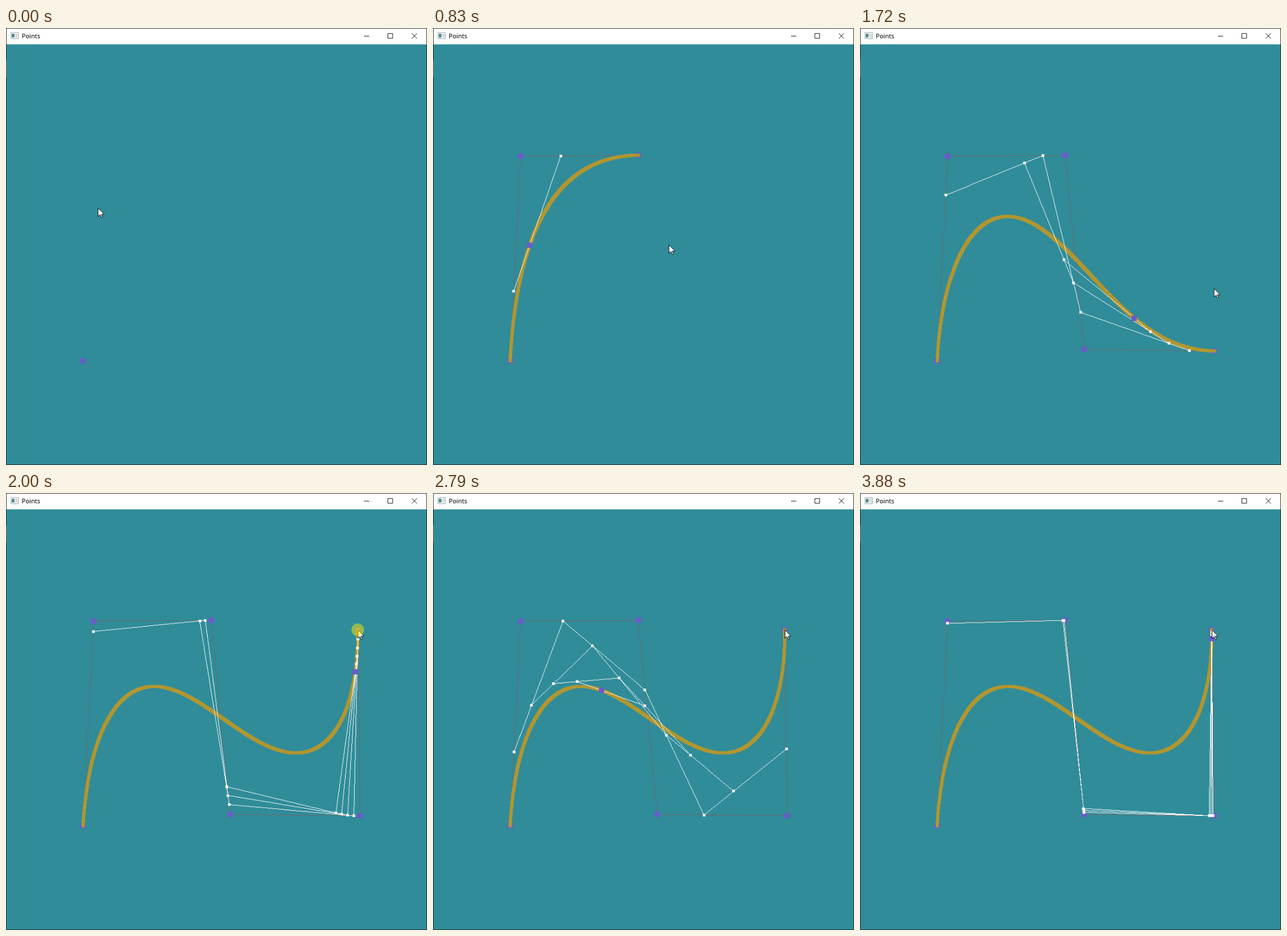
An HTML page with a canvas for the animation above (3.93 s loop, 735 px wide and 762 px high).

```html
<!DOCTYPE html>
<html lang="en">
<head>
<meta charset="utf-8">
<title>Points</title>
<style>
  html, body { margin: 0; width: 100%; height: 100%; overflow: hidden; background: #fff; }
  canvas, svg { position: absolute; left: 0; top: 0; display: block; width: 735px; height: 762px; }
  text { font: 12px "Noto Sans", "Open Sans", sans-serif; fill: #000; }
</style>
</head>
<body>
<!-- The window is laid out at 802 x 831 and shown slightly reduced -->
<canvas width="802" height="831"></canvas>
<svg viewBox="0 0 802 831" preserveAspectRatio="none" fill="none">
  <path d="M0 0H802V31H0Z" fill="#fff"/>
  <path d="M.5 .5H801.5V830.5H.5Z" stroke="#1c2325"/>
  <path d="M0 62h1v31h-1z" fill="#8a6a62"/>
  <path d="M9.5 8.5h14v12h-14z" fill="#f4f6f6" stroke="#9ba3a8"/>
  <path d="M11 11h5v7h-5z" fill="#438a8a"/>
  <path d="M17 11h5v7h-5z" fill="#d5dcda"/>
  <path d="M682 15.5h10M727.5 10.5h9v9h-9zM773 10l10 10m0-10l-10 10" stroke="#000"/>
  <text x="30" y="20">Points</text>
</svg>
<script>
const ctx = document.querySelector('canvas').getContext('2d');
const LOOP = 3930, FRAMES = 85, STEP = LOOP / FRAMES;
const TEAL = '#308c99', PURPLE = '#6a5acd', GOLD = '#b2962f', WHITE = '#fff', BROWN = '#73676a';

// Control points in click order, and the bends the mouse takes between them
const points = [[147, 633], [167, 244], [391, 242], [427, 611], [675, 614], [670, 260]];
const bends = [[191, 441], [279, 243], [491, 424], [561, 636], [673, 437]];

// One click per beat: a short hold, then the way to the next point
const BEAT = 455, FIRST_CLICK = 145, HOLD = .22;

// Curve parameter over time; the whole part counts the sweeps
const sweep = [[0, -.12], [1387, .65], [1990, .95], [2775, 1.36], [LOOP, 2.02]];

const mix = (a, b, t) => a.map((v, i) => v + (b[i] - v) * t);
const lerpPairs = (list, t) => list.slice(1).map((p, i) => mix(list[i], p, t));
const ease = p => { const q = p ** .75; return q * q * (3 - 2 * q); };

function bezier(list, t) {
  while (list.length > 1) list = lerpPairs(list, t);
  return list[0];
}

function sweepAt(time) {
  const i = sweep.findIndex(([end]) => time < end);
  const [t0, a] = sweep[i - 1], [t1, b] = sweep[i];
  const value = Math.round((a + (b - a) * (time - t0) / (t1 - t0)) * 100) / 100;
  return value - Math.floor(value);
}

function square([x, y], size, color) {
  ctx.fillStyle = color;
  ctx.fillRect(Math.round(x - size / 2), Math.round(y - size / 2), size, size);
}

// Unsmoothed one-pixel line
function line([x0, y0], [x1, y1], color) {
  const dx = x1 - x0, dy = y1 - y0;
  const steps = Math.max(1, Math.ceil(Math.max(Math.abs(dx), Math.abs(dy))));
  for (let i = 0; i <= steps; i++) square([x0 + dx * i / steps, y0 + dy * i / steps], 1, color);
}

function polyline(list, color) {
  for (let i = 1; i < list.length; i++) line(list[i - 1], list[i], color);
}

function drawCurve(list, t) {
  polyline(list, BROWN);
  list.forEach(p => square(p, 10, PURPLE));
  if (list.length < 2) return;

  for (let i = 0; i <= 1000; i++) square(bezier(list, i / 1000), 6, GOLD);

  const levels = [];
  for (let level = lerpPairs(list, t); level.length > 1; level = lerpPairs(level, t)) levels.push(level);
  levels.forEach(level => polyline(level, WHITE));
  levels.flat().forEach(p => square(p, 5, WHITE));
  square(bezier(list, t), 10, PURPLE);
}

const arrow = new Path2D('M.5 .5V16.5L4.2 13L7 18.8L9.3 17.8L6.6 12.2H11.9Z');

function drawMouse([x, y], pressed) {
  ctx.save();
  ctx.translate(Math.round(x), Math.round(y));
  ctx.fillStyle = WHITE;
  ctx.strokeStyle = '#000';
  ctx.fill(arrow);
  ctx.stroke(arrow);
  if (pressed) {
    ctx.fillStyle = 'rgba(250, 240, 0, .48)';
    ctx.beginPath();
    ctx.arc(0, 0, 12, 0, 2 * Math.PI);
    ctx.fill();
  }
  ctx.restore();
}

function draw(time) {
  const beat = (time - FIRST_CLICK) / BEAT + 1;
  const current = Math.min(Math.floor(beat), points.length - 1);
  const pressed = beat - current < HOLD;
  const travel = Math.max(0, (beat - current - HOLD) / (1 - HOLD));
  const moving = current < bends.length;
  const mouse = moving ? bezier([points[current], bends[current], points[current + 1]], ease(travel)) : points[current];

  ctx.fillStyle = TEAL;
  ctx.fillRect(0, 0, 802, 831);
  drawCurve(points.slice(0, current + 1), sweepAt(time));
  drawMouse(mouse, pressed);
}

const begin = performance.now();
let shown = -1;
function tick() {
  // Refreshes fall on whole hundredths, so lead by a few milliseconds
  const frame = Math.floor((performance.now() - begin + 7) / STEP) % FRAMES;
  if (frame !== shown) draw((shown = frame) * STEP);
  requestAnimationFrame(tick);
}
tick();
</script>
</body>
</html>
```
